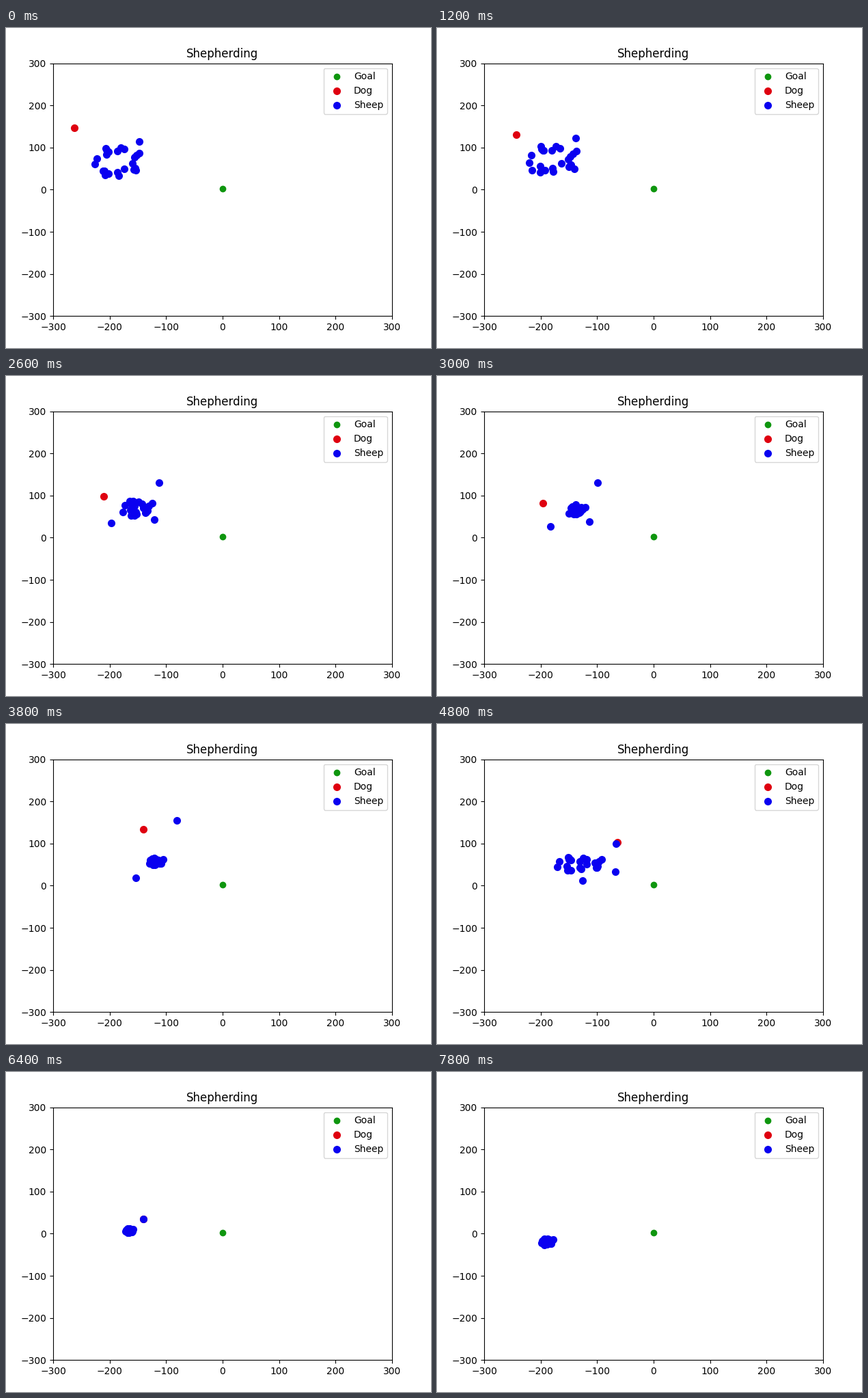
Animation of 622 by 468 pixels, one loop 8000 ms. Source, as a matplotlib script:

```python
import numpy as np
import matplotlib.pyplot as plt
from matplotlib.animation import FuncAnimation

W, H, DPI = 622, 468, 100
LEFT, TOP, AX_W, AX_H = 68.98, 51.62, 496, 369.6
FRAMES, STEP = 40, 200
HERD, KNOTS = 22, 7
GREEN, RED, BLUE = "#0f960f", "#df0010", "#0a00f0"

# The herd spreads and closes up again: centre, radii and looseness in pixels.
times = [0, 2000, 3000, 3800, 4800, 6400, 7800]
herd = np.array([(163, 194, 26, 22, 4),
                 (174, 188, 26, 18, 6),
                 (204, 196, 5, 4, 4),
                 (219.5, 201, 6, 3.5, 2.5),
                 (209, 204, 26, 9, 4),
                 (180.5, 232, 4, 3, 1),
                 (161, 248, 6, 4.5, 1.5)])

# Sheep stand in small knots on a ring around the herd's centre.
rng = np.random.default_rng(4)
angle = np.radians(28) + 2 * np.pi * (np.arange(HERD) % KNOTS) / KNOTS
reach = rng.uniform(0.7, 1.1, HERD)
ring = np.column_stack([np.cos(angle), np.sin(angle)]) * reach[:, None]
loose = rng.normal(size=(HERD, 2)).clip(-2, 2)


def path(*points):
    """Key points of a lone animal, which ends up at the herd's centre."""
    return np.array([*points, *herd[len(points):, :2]], float)


runaway = path((195, 166), (208, 157), (235, 156), (250, 141), (262, 175), (201, 215))
straggler = path((142, 209), (137, 207), (166, 220), (190, 225), (213, 229))
drifter = path((190, 208), (209, 205), (223, 213), (227, 204), (261, 216))

# The dog catches the runaway and then stays with it.
dog_path = path((100, 146), (126, 162), (155, 186), (201, 154), (264, 173), (201, 215))


def along(keys, t):
    return np.array([np.interp(t, times, column) for column in keys.T])


def flock(t):
    cx, cy, rx, ry, spread = along(herd, t)
    group = (cx, cy) + ring * (rx, ry) + loose * spread
    singles = [along(p, t) for p in (runaway, straggler, drifter)]
    return np.vstack([group, singles])


def to_data(p):
    """Stage pixels to axes units."""
    p = np.atleast_2d(p)
    return np.column_stack([(p[:, 0] - LEFT) / AX_W * 600 - 300,
                            300 - (p[:, 1] - TOP) / AX_H * 600])


fig = plt.figure(figsize=(W / DPI, H / DPI), dpi=DPI)
ax = fig.add_axes([LEFT / W, 1 - (TOP + AX_H) / H, AX_W / W, AX_H / H])
ax.set(xlim=(-300, 300), ylim=(-300, 300), title="Shepherding")

ax.scatter([0], [1.5], s=36, color=GREEN, label="Goal")
dog = ax.scatter([0], [0], s=49, color=RED, label="Dog")
sheep = ax.scatter([0], [0], s=49, color=BLUE, label="Sheep")
ax.legend(loc="upper right")


def draw(i):
    t = i * STEP
    dog.set_offsets(to_data(along(dog_path, t)))
    sheep.set_offsets(to_data(flock(t)))
    return dog, sheep


anim = FuncAnimation(fig, draw, frames=FRAMES, interval=STEP,
                     init_func=lambda: draw(0), repeat=True, repeat_delay=0)
plt.show()
```
